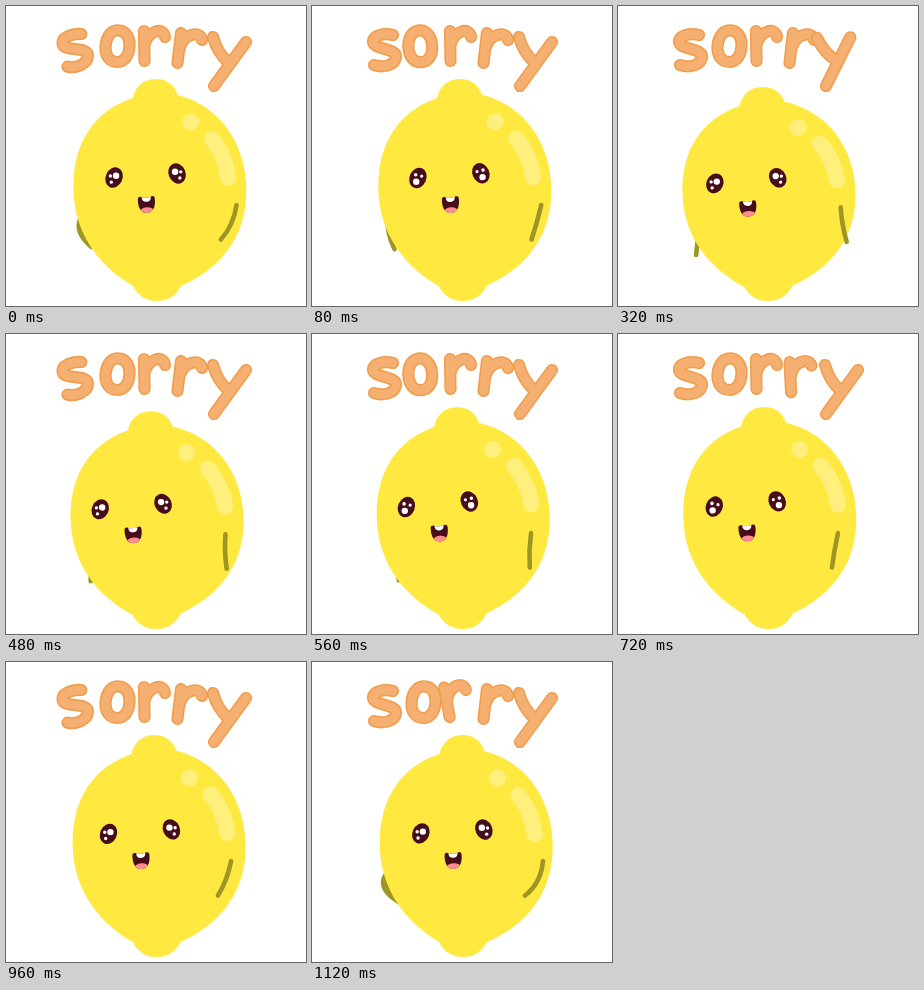
An HTML page for the animation above (1.2 s loop, 300 by 300 pixels).

```html
<!DOCTYPE html>
<html lang="en">
<head>
<meta charset="utf-8">
<title>sorry</title>
<style>
  html, body { margin: 0; width: 100%; height: 100%; overflow: hidden; background: #fff; }
  svg { display: block; width: 100vw; height: 100vh; }
  .line { fill: none; stroke-linecap: round; stroke-linejoin: round; }
  .edge { stroke: #f09e4e; stroke-width: 12.2; }
  .core { stroke: #f5af70; stroke-width: 9; }
  .arm { stroke: #9d9624; stroke-width: 4.6; }
  #leftArm { fill: #9d9624; }
  .dark { fill: #470d1a; }
  .shine { fill: #fff07d; }
</style>
</head>
<body>
<svg viewBox="0 0 300 300" role="img" aria-label="sorry">
  <g id="word"></g>
  <path id="leftArm" class="line arm"/>
  <g id="lemon">
    <path fill="#ffe940" d="M127 92C130 79 139 73 150 73S169 79 172 89
      C215 100 240.5 139 240.5 184C240.5 228 218 261 175 280
      C170 290 162 295 151 295S132 290 127 280
      C93 260 67.5 227 67.5 181C67.5 135 90 104 127 92Z"/>
    <circle class="shine" cx="185" cy="116" r="8.5"/>
    <path class="line" stroke="#fff07d" stroke-width="16" d="M206 133Q219 148 222.5 172"/>
    <g id="face">
      <clipPath id="lips"><path d="M132 193Q132 190 135 190.5Q140.5 193 146 190.5Q149 190 149 193
        C149.5 202 146 207 140.5 207S131.5 202 132 193Z"/></clipPath>
      <g transform="rotate(-3 140.5 198)"><g clip-path="url(#lips)">
        <rect class="dark" x="130" y="188" width="21" height="21"/>
        <ellipse fill="#ff8d8d" cx="140.5" cy="206" rx="7.5" ry="4.8"/>
        <path fill="#fff" d="M136 189H145V192Q144.5 195.8 140.5 195.8T136 192Z"/>
      </g></g>
    </g>
  </g>
  <path id="rightArm" class="line arm"/>
</svg>
<script>
const STEP = 80, STEPS = 15, REST = 14;
const $ = id => document.getElementById(id);

function add(parent, tag, attrs) {
  const el = document.createElementNS("http://www.w3.org/2000/svg", tag);
  for (const key in attrs) el.setAttribute(key, attrs[key]);
  parent.append(el);
  return el;
}

// Each letter: stroke path and the point it tilts around.
const letters = [
  ["M81 29C72 27 61 29 61 36C62 44 85 42 84 51C83 60 70 62 62 59", "72 63"],
  ["M110 24.5C119 23 124 31 123.5 40C123 50 118 56 111.5 56C103 56 99 49 99.5 41C100 32 104 25.5 110 24.5Z", "111 60"],
  ["M138 25L138.5 55M138.5 39C142 25 157 20 159 31", "138.5 60"],
  ["M175 27L171.5 57M174 41C178 28 194 24 196 34", "180 48"],
  ["M207 31C210 42 215 50 222 56M240 36L208 80", "208 80"]
].map(([d, pivot]) => {
  const g = add($("word"), "g", {});
  for (const kind of ["edge", "core"]) add(g, "path", { d, class: "line " + kind });
  return { g, pivot };
});

// Highlights of the left eye (x, y, radius) in two alternating looks.
const looks = [
  [[2, -1.8, 3.2], [-3.7, -1.6, 1.7], [-2.8, 4.6, 1.7]],
  [[-1.7, 3.8, 3.2], [-2.2, -3.2, 1.8], [3.8, -1.8, 1.6]]
];
const sparkles = [[], []];
for (const place of ["translate(108 171.5)", "translate(171 167.5) scale(-1 1)"]) {
  const eye = add($("face"), "g", { transform: place });
  add(eye, "ellipse", { class: "dark", rx: 8.4, ry: 10.5, transform: "rotate(24)" });
  looks.forEach((dots, i) => {
    const g = add(eye, "g", { fill: "#fff" });
    for (const [cx, cy, r] of dots) add(g, "circle", { cx, cy, r });
    sparkles[i].push(g);
  });
}

// 0 at rest, eases to 1 at the step `far`, then returns with the given power.
function swing(n, far, power) {
  const since = (n - REST + STEPS) % STEPS;
  const out = far + STEPS - REST;
  if (since < out) return (1 - Math.cos(Math.PI * since / out)) / 2;
  return 1 - ((since - out) / (STEPS - out)) ** power;
}

function bump(n, mid, reach) {
  const d = Math.min(1, Math.abs(n - mid) / reach);
  return (1 + Math.cos(Math.PI * d)) / 2;
}

// An arm from shoulder to hand, bowed at the elbow.
function arm(id, x, y, dx, dy, bendX, bendY) {
  $(id).setAttribute("d", `M${x} ${y}q${dx / 2 + bendX} ${dy / 2 + bendY} ${dx} ${dy}`);
}

function draw(n) {
  const lean = 0.5 - 6.7 * swing(n, 3.5, 2);
  const bow = 9 * bump(n, 4.6, 2.7);
  const gaze = 0.8 - 14 * swing(n, 6, 2);
  $("lemon").setAttribute("transform",
    `translate(151 295) rotate(${lean / 222 * 180 / Math.PI}) scale(1 ${1 - bow / 222}) translate(-151 -295)`);
  $("face").setAttribute("transform", `translate(${gaze - lean * .44} 0)`);

  const turn = 12 * swing(n, 7, 2);
  const drop = swing(n, 4, 1);
  const elbow = (1 - drop) ** 3;
  const reach = 24 * drop - 18;
  arm("rightArm", 231 - turn, 199 + bow * .3, reach, 34.5, 9 * elbow - 2, 5 * elbow);
  arm("leftArm", 74 + turn, 212, -.7 * reach, 28 + 9 * drop, -16 * elbow, 0);

  sparkles.forEach((set, i) => set.forEach(g => g.style.display = n % 2 === i ? "" : "none"));
  // The tilt runs along the word, then rests one step.
  letters.forEach(({ g, pivot }, i) =>
    g.setAttribute("transform", `rotate(${n % 6 === i ? -9.5 : 0} ${pivot})`));
}

const start = performance.now();
function tick() {
  draw(Math.floor((performance.now() - start) / STEP) % STEPS);
  requestAnimationFrame(tick);
}
tick();
</script>
</body>
</html>
```
